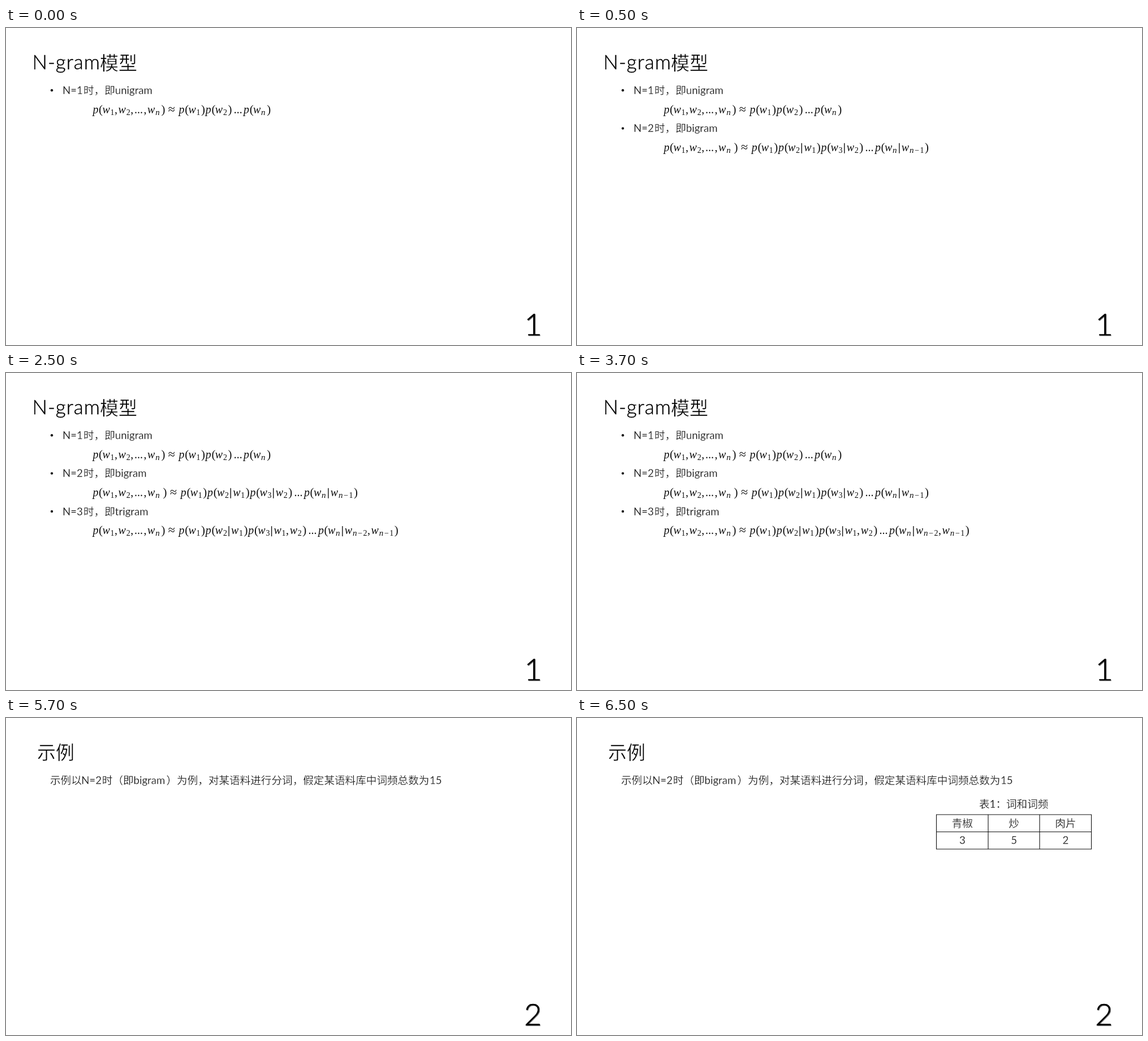
An HTML page that plays this animation: 999 by 561 pixels, repeating every 8 s.

```html
<!DOCTYPE html>
<html lang="zh-CN">
<head>
<meta charset="utf-8">
<title>N-gram模型</title>
<style>
  html, body { margin: 0; width: 100%; height: 100%; overflow: hidden; background: #fff; }
  svg { display: block; width: 100vw; height: 100vh; }
  /* A white outline thins the strokes of the regular weight. */
  text {
    fill: #111; stroke: #fff; stroke-width: .28;
    font-family: Lato, "Noto Sans CJK SC", "Noto Sans CJK", sans-serif; font-size: 18.6px;
  }
  .title { font-size: 33px; fill: #000; stroke-width: .5; }
  .latin { font-size: 35px; font-weight: 300; letter-spacing: 1px; stroke: #000; stroke-width: .4; }
  .page {
    font-size: 54px; font-weight: 300; fill: #000; stroke: #000; stroke-width: .7;
    filter: drop-shadow(1px 1px .6px rgba(0, 0, 0, .4));
  }
  .mid { text-anchor: middle; }
  .math { font-family: "Liberation Serif", "Noto Serif", serif; font-size: 20px; stroke: none; }
  .it { font-style: italic; }
  .paren { font-size: 21px; }
  .approx { font-size: 22px; }
  .sub { font-size: 14px; }
  .sub.it { font-size: 15px; }
  .grid { fill: none; stroke: #111; stroke-width: 1.1; stroke-linecap: square; }
  .bar { stroke: #111; stroke-width: 1.4; }
</style>
</head>
<body>
<svg id="stage" viewBox="0 0 999 561" preserveAspectRatio="none"></svg>
<script>
const LOOP = 8000;
const stage = document.getElementById('stage');

function add(parent, tag, attrs, content) {
  const el = document.createElementNS('http://www.w3.org/2000/svg', tag);
  for (const key in attrs) el.setAttribute(key, attrs[key]);
  if (content !== undefined) el.textContent = content;
  parent.appendChild(el);
  return el;
}

const write = (parent, x, y, content, cls = '') =>
  add(parent, 'text', { x, y, class: cls }, content);

// Glyph rules: advance, offset, class, drawn text
const glyphs = {
  'p': [11, 0.9, 'it'],
  'w': [13.9, 0.2, 'it'],
  '(': [6.7, 0.6, 'paren'],
  ')': [8, 1.2, 'paren'],
  ',': [6.6, 0.2, ''],
  '…': [16.7, 0.3, '', '...'],
  '≈': [23.4, 5.6, 'approx'],
  '|': [6.6, 2.9, 'bar'],
  ' ': [3.2, 0, '']
};

function subscript(parent, x, y, chars) {
  for (const ch of chars) {
    write(parent, x + 0.4, y + 3.2, ch, 'math sub' + (ch === 'n' ? ' it' : ''));
    x += ch === 'n' ? 9.4 : ch === '−' ? 9.2 : 7.7;
  }
  return x;
}

function formula(parent, x, y, source) {
  for (const [, ch, sub] of source.matchAll(/(.)((?:n−\d|n|\d)?)/gu)) {
    const [advance, dx, cls, shown = ch] = glyphs[ch];
    if (ch === '|') {
      add(parent, 'line', { x1: x + dx, x2: x + dx, y1: y - 14, y2: y + 4, class: cls });
    } else if (ch !== ' ') {
      write(parent, x + dx, y, shown, 'math ' + cls);
    }
    x = subscript(parent, x + advance, y, sub);
  }
}

const scene = (start, end) => ({ start, end, node: add(stage, 'g', {}) });

const first = scene(0, 4500);
write(first.node, 46.5, 73.3, 'N-gram', 'title latin');
write(first.node, 166, 73.5, '模型', 'title');
write(first.node, 916.5, 543.5, '1', 'page');

const items = [
  [0, 'unigram', 'p(w1,w2,…,wn)≈p(w1)p(w2) …p(wn)'],
  [500, 'bigram', 'p(w1,w2,…,wn )≈p(w1)p(w2|w1)p(w3|w2) …p(wn|wn−1)'],
  [2500, 'trigram', 'p(w1,w2,…,wn)≈p(w1)p(w2|w1)p(w3|w1,w2) …p(wn|wn−2,wn−1)']
].map(([start, name, source], i) => {
  const item = scene(start, 4500);
  const dy = i * 67.3;
  add(item.node, 'circle', { cx: 81, cy: 110.3 + dy, r: 2.2, fill: '#111' });
  write(item.node, 100, 117 + dy, `N=${i + 1}`);
  write(item.node, 137, 117 + dy, '时，即');
  write(item.node, 192.8, 117 + dy, name);
  formula(item.node, 152.5, 150.5 + dy, source);
  return item;
});

const second = scene(4500, LOOP);
write(second.node, 55, 72.5, '示例', 'title');
write(second.node, 916, 543.5, '2', 'page');
[
  [78, '示例以'], [133.3, 'N=2'], [169.8, '时（即'], [225.5, 'bigram'],
  [283.5, '）为例，对某语料进行分词，假定某语料库中词频总数为'], [749, '15']
].forEach(([x, run]) => write(second.node, x, 117, run));

const table = scene(6500, LOOP);
write(table.node, 711, 159, '表1：词和词频');
add(table.node, 'path', {
  class: 'grid',
  d: 'M635.5 171H909.5V232H635.5ZM635.5 201.5H909.5M727 171V232M818 171V232'
});
[['青椒', 3], ['炒', 5], ['肉片', 2]].forEach(([word, count], i) => {
  const x = 681.3 + i * 91.3;
  write(table.node, x, 192.7, word, 'mid');
  write(table.node, x, 223, count, 'mid');
});

const scenes = [first, ...items, second, table];

function render(time) {
  const t = time % LOOP;
  for (const { start, end, node } of scenes) {
    node.setAttribute('visibility', t >= start && t < end ? 'visible' : 'hidden');
  }
}

const origin = performance.now();
function tick() {
  render(performance.now() - origin);
  requestAnimationFrame(tick);
}
tick();
</script>
</body>
</html>
```
